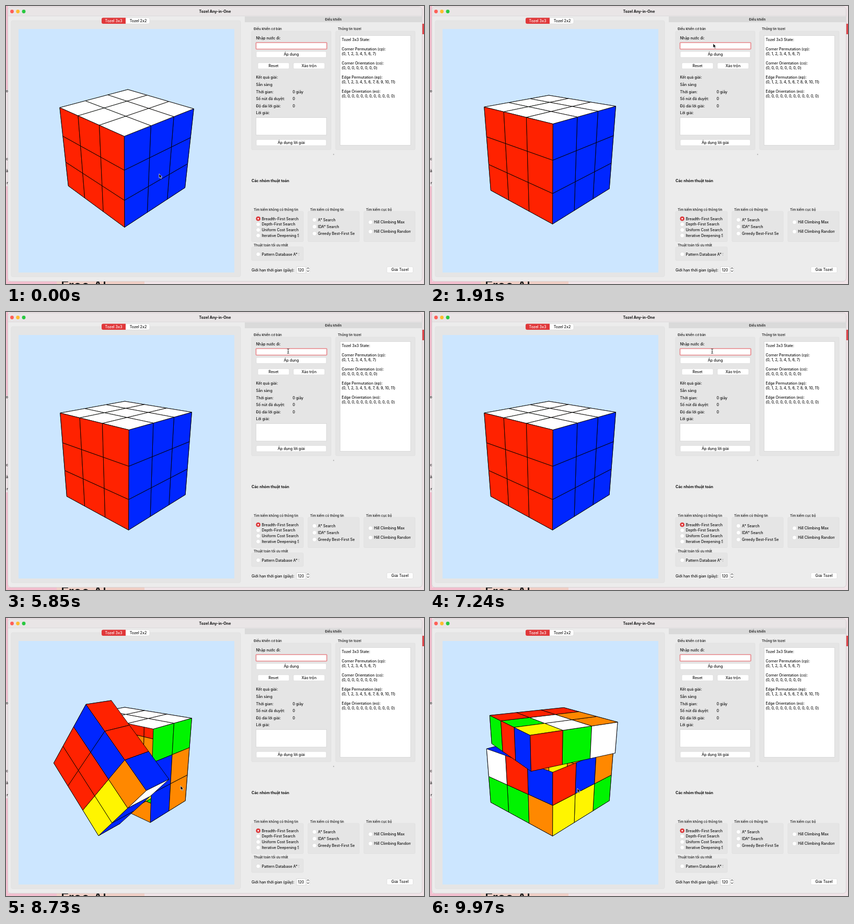
These frames come from a looping animation (800 px wide and 532 px high, 10000 ms). An HTML page:

```html
<!DOCTYPE html>
<html lang="vi">
<head>
<meta charset="utf-8">
<title>Tozel Any-in-One</title>
<style>
  html, body { margin: 0; width: 100%; height: 100%; overflow: hidden; }
  svg { display: block; font: 500 7.1px Inter, sans-serif; font-feature-settings: "calt" 0; }
  text { white-space: pre; fill: #111; }
  .small { font-size: 6.3px; }
  .mid { text-anchor: middle; }
  .end { text-anchor: end; }
  .bold { font-weight: 700; }
  .light { fill: #fff; }
  .group { fill: #e5e5e5; stroke: #dedede; stroke-width: .7; }
  .field { fill: #fff; stroke: #cfcfcf; stroke-width: .7; }
  .button { fill: #fff; stroke: #d6d6d6; stroke-width: .6; }
  #cube { stroke: #000; stroke-width: .9; stroke-linejoin: round; }
</style>
</head>
<body>
<svg width="800" height="532" viewBox="0 0 800 532">
  <clipPath id="columns">
    <path d="M470 393h90.5v100h-90.5zM578 393h90v60h-90zM685 393h89.5v60h-89.5z"/>
  </clipPath>
  <rect width="800" height="532" fill="#f1e4e8"/>
  <path fill="#f3bfcf" d="M0 0h4v160h-4zM0 345h4v187h-4zM0 527h97v5h-97z"/>
  <path fill="#f1cfc6" d="M97 527h168v5h-168z"/>
  <path fill="#e0454a" d="M796 34h4v20h-4z"/>
  <text x="105" y="545" font-size="26">Free AI</text>
  <rect x="3.5" y="1.5" width="793" height="525.5" rx="6" fill="#ececec" stroke="#c9c5c6" stroke-width=".7"/>
  <path fill="#e9e5e6" d="M4 19V8q0-6 6-6h780q6 0 6 6v11z"/>
  <path stroke="#d5d2d3" stroke-width=".7" d="M4 19h792"/>
  <circle cx="11.5" cy="10.5" r="3.4" fill="#fe5f57"/>
  <circle cx="22.7" cy="10.5" r="3.4" fill="#febc2e"/>
  <circle cx="34" cy="10.5" r="3.4" fill="#28c840"/>
  <rect class="group" x="10" y="28" width="439" height="490" rx="3"/>
  <rect x="24" y="44" width="413" height="466" fill="#cce6ff"/>
  <rect x="183" y="22.5" width="92" height="11.5" rx="3" fill="#fff" stroke="#d6d6d6" stroke-width=".6"/>
  <path fill="#e0383a" d="M229 22.5v11.5h-43q-3 0-3-3v-5.5q0-3 3-3z"/>
  <rect x="457" y="20" width="340" height="11" fill="#dadada"/>
  <circle cx="627" cy="284" r="1.2" fill="#bbb"/>
  <g id="ui"></g>
  <rect x="478.5" y="70" width="135.5" height="12.5" rx="1" fill="#fff" stroke="#e8868a" stroke-width="1.6"/>
  <text id="entry" x="480" y="79.3"></text>
  <path id="caret" stroke="#222" stroke-width=".8" d="M.5 71.5v9.5"/>
  <path d="M576 503l2-2.500 2 2.500M576 506l2 2.500 2-2.500" fill="none" stroke="#333"/>
  <g id="cube"></g>
  <path id="arrow" d="M0 0v8.200l1.900-1.700 1.400 3.100 1.400-.6-1.400-3h2.500z" stroke="#fff" stroke-width=".7"/>
  <path id="beam" d="M-2-4.500q2 0 2 1.200v6.600q0 1.200-2 1.200M2-4.500q-2 0-2 1.200m0 6.600q0 1.200 2 1.200M-1 1h2" fill="none" stroke="#111" stroke-width=".8"/>
</svg>
<script>
const $ = id => document.getElementById(id);

// ---------- static interface ----------
const text = (x, y, s, cls = '') => `<text class="${cls}" x="${x}" y="${y}">${s}</text>`;
const box = (cls, x, y, w, h, r = 2) =>
  `<rect class="${cls}" x="${x}" y="${y}" width="${w}" height="${h}" rx="${r}"/>`;
const button = (x, y, w, s) => box('button', x, y, w, 11.5) + text(x + w / 2, y + 8.3, s, 'mid');
const lines = (x, y, step, list) => list.map((s, i) => s && text(x, y + i * step, s)).join('');
const radios = (x, y, step, list, chosen) => list.map((s, i) => {
  const cy = y + i * step, on = i === chosen;
  return `<circle cx="${x}" cy="${cy}" r="4" fill="${on ? '#e0383a' : '#fff'}" stroke="${on ? '#d03033' : '#d2d2d2'}" stroke-width=".6"/>`
    + (on ? `<circle cx="${x}" cy="${cy}" r="1.5" fill="#fff"/>` : '') + text(x + 6.7, cy + 2.6, s);
}).join('');

$('ui').innerHTML = [
  text(4, 165, 'no', 'end'), text(4, 295, 'ec', 'end'), text(4, 318, 'ã', 'end'), text(4, 341, 'r', 'end'),
  text(400, 12.6, 'Tozel Any-in-One', 'mid bold'),
  text(206, 31, 'Tozel 3x3', 'mid light'),
  text(253, 31, 'Tozel 2x2', 'mid'),
  text(626.5, 27.6, 'Điều khiển', 'mid small'),
  box('group', 470, 48, 152, 227), box('group', 631, 48, 152, 227),
  box('group', 470, 393, 99, 58), box('group', 578, 393, 98, 58), box('group', 685, 393, 98, 58),
  box('group', 470, 461, 99, 26),
  text(474, 46.3, 'Điều khiển cơ bản', 'small'), text(635, 46.3, 'Thông tin tozel', 'small'),
  text(474, 391.6, 'Tìm kiếm không có thông tin', 'small'),
  text(582, 391.6, 'Tìm kiếm có thông tin', 'small'),
  text(689, 391.6, 'Tìm kiếm cục bộ', 'small'),
  text(474, 460, 'Thuật toán tối ưu nhất', 'small'),
  text(478.5, 64, 'Nhập nước đi:'),
  button(479, 87, 134, 'Áp dụng'), button(482, 108.7, 60, 'Reset'), button(550, 108.7, 60, 'Xáo trộn'),
  lines(478.5, 139.3, 13.6, ['Kết quả giải:', 'Sẵn sàng', 'Thời gian:', 'Số nút đã duyệt:', 'Độ dài lời giải:', 'Lời giải:']),
  lines(548.5, 166.5, 13.6, ['0 giây', '0', '0']),
  box('field', 478.5, 213.5, 135, 33.5, 0),
  button(479, 255.7, 134, 'Áp dụng lời giải'),
  box('field', 639.5, 56.5, 135, 210, 0),
  lines(642.5, 66.5, 9.05, ['Tozel 3x3 State:', '',
    'Corner Permutation (cp):', '(0, 1, 2, 3, 4, 5, 6, 7)', '',
    'Corner Orientation (co):', '(0, 0, 0, 0, 0, 0, 0, 0)', '',
    'Edge Permutation (ep):', '(0, 1, 2, 3, 4, 5, 6, 7, 8, 9, 10, 11)', '',
    'Edge Orientation (eo):', '(0, 0, 0, 0, 0, 0, 0, 0, 0, 0, 0, 0)']),
  text(470, 336.5, 'Các nhóm thuật toán', 'bold'),
  '<g clip-path="url(#columns)">',
  radios(482.7, 407, 10.75, ['Breadth-First Search', 'Depth-First Search', 'Uniform Cost Search', 'Iterative Deepening Se'], 0),
  radios(590.3, 409.3, 13.05, ['A* Search', 'IDA* Search', 'Greedy Best-First Se']),
  radios(697.5, 413.8, 17.9, ['Hill Climbing Max', 'Hill Climbing Random']),
  radios(482.7, 475, 0, ['Pattern Database A* S']),
  '</g>',
  text(470, 507.5, 'Giới hạn thời gian (giây):'),
  box('field', 556, 499, 18, 12, 0), text(558.5, 507.5, '120'),
  box('button', 575, 498.5, 6, 13), button(729, 499, 50, 'Giải Tozel')
].join('');
$('cube').before($('ui').nextElementSibling);

// ---------- cube model: axes x = right, y = up, z = front ----------
const MOVES = { r: [0, 1], l: [0, -1], u: [1, 1], d: [1, -1], f: [2, 1], b: [2, -1] };
const COLORS = [['#0026ff', '#00f400'], ['#fff', '#fff500'], ['#ff2200', '#ff8800']];
const TYPED = 'u r u f d b l u';
const turns = TYPED.split(' ').map(m => MOVES[m]);
const TURN_START = 7615, TURN_TIME = 320.4;

const rotate = (p, axis, angle) => {
  const j = (axis + 1) % 3, k = (axis + 2) % 3, c = Math.cos(angle), s = Math.sin(angle), q = [...p];
  q[j] = c * p[j] - s * p[k];
  q[k] = s * p[j] + c * p[k];
  return q;
};
const inLayer = (tile, [axis, side]) =>
  tile.points.reduce((sum, p) => sum + p[axis], 0) / 4 * side > .5;
const turn = (tiles, move, amount) => tiles.map(tile => {
  if (!inLayer(tile, move)) return tile;
  const angle = -move[1] * amount * Math.PI / 2;
  return { ...tile, moving: amount < 1, points: tile.points.map(p => rotate(p, move[0], angle)) };
});

const solved = [];
for (let axis = 0; axis < 3; axis++)
  for (const side of [1, -1])
    for (let n = 0; n < 9; n++) {
      const a = n % 3 - 1, b = Math.floor(n / 3) - 1;
      const points = [[1, 1], [-1, 1], [-1, -1], [1, -1]].map(([u, v]) => {
        const p = [];
        p[axis] = side;
        p[(axis + 1) % 3] = side * (2 * a + u) / 3;
        p[(axis + 2) % 3] = (2 * b + v) / 3;
        return p;
      });
      solved.push({ points, color: COLORS[axis][side > 0 ? 0 : 1] });
    }
const states = [solved];
turns.forEach((move, i) => states.push(turn(states[i], move, 1)));

// ---------- motion ----------
const mix = (a, b, u) => a + (b - a) * u;
const clamp = u => Math.min(1, Math.max(0, u));
const smooth = u => u * u * (3 - 2 * u);
const cubic = u => u < .5 ? 4 * u ** 3 : 1 - 4 * (1 - u) ** 3;

function drawCube(t) {
  const view = smooth(clamp(t / 900)), rad = Math.PI / 180;
  const pitch = mix(27.5, 20.3, view) * rad, yaw = (45 - mix(-1.5, 1.7, view)) * rad;
  const project = p => {
    const [x, y, z] = rotate(rotate(p, 1, -yaw), 0, pitch);
    const scale = 562.5 / (6.667 - z);
    return [230.4 + x * scale, 276 - y * scale];
  };
  let tiles = solved, side = 1;
  if (t >= TURN_START) {
    const progress = (t - TURN_START) / TURN_TIME, i = Math.floor(progress);
    side = turns[i][1];
    tiles = turn(states[i], turns[i], cubic(progress - i));
  }
  // The far part first, and inside each part the back faces first.
  $('cube').innerHTML = tiles.map(({ points, color, moving }) => {
    const q = points.map(project);
    const area = q.reduce((sum, [x, y], i) => {
      const [x2, y2] = q[(i + 1) % 4];
      return sum + x * y2 - x2 * y;
    }, 0);
    return { q, color, order: (moving ? 2 * side : 0) + (area < 0 ? 1 : 0) };
  }).sort((a, b) => a.order - b.order)
    .map(({ q, color }) => `<polygon fill="${color}" points="${q.map(p => p.map(v => v.toFixed(2))).join(' ')}"/>`)
    .join('');
}

function drawEntry(t) {
  const count = t < TURN_START ? Math.max(0, Math.floor((t - 2600) / 307)) : 0;
  const entry = $('entry');
  entry.textContent = count ? TYPED.slice(0, count) : "Nhập nước đi (ví dụ: R U R' U')";
  entry.style.fill = count ? '#111' : '#8c8c8c';
  const x = count ? 480.5 + entry.getComputedTextLength() : 480;
  $('caret').setAttribute('transform', `translate(${x})`);
}

const PATH = [[0, 293, 321], [900, 300, 307], [1050, 300, 307], [1850, 543, 70], [2000, 540, 75],
  [8200, 540, 75], [8650, 334, 321], [9000, 334, 321], [9800, 282, 326], [10000, 282, 326]];

function drawPointer(t) {
  const i = PATH.findIndex(p => p[0] > t), [t0, x0, y0] = PATH[i - 1], [t1, x1, y1] = PATH[i];
  const u = smooth((t - t0) / (t1 - t0)), beam = t >= 2000 && t < 8230;
  for (const id of ['arrow', 'beam']) {
    $(id).setAttribute('transform', `translate(${mix(x0, x1, u)} ${mix(y0, y1, u)})`);
    $(id).style.display = (id === 'beam') === beam ? '' : 'none';
  }
}

function frame() {
  const t = performance.now() % 10000;
  drawCube(t);
  drawEntry(t);
  drawPointer(t);
  requestAnimationFrame(frame);
}
frame();
</script>
</body>
</html>
```
